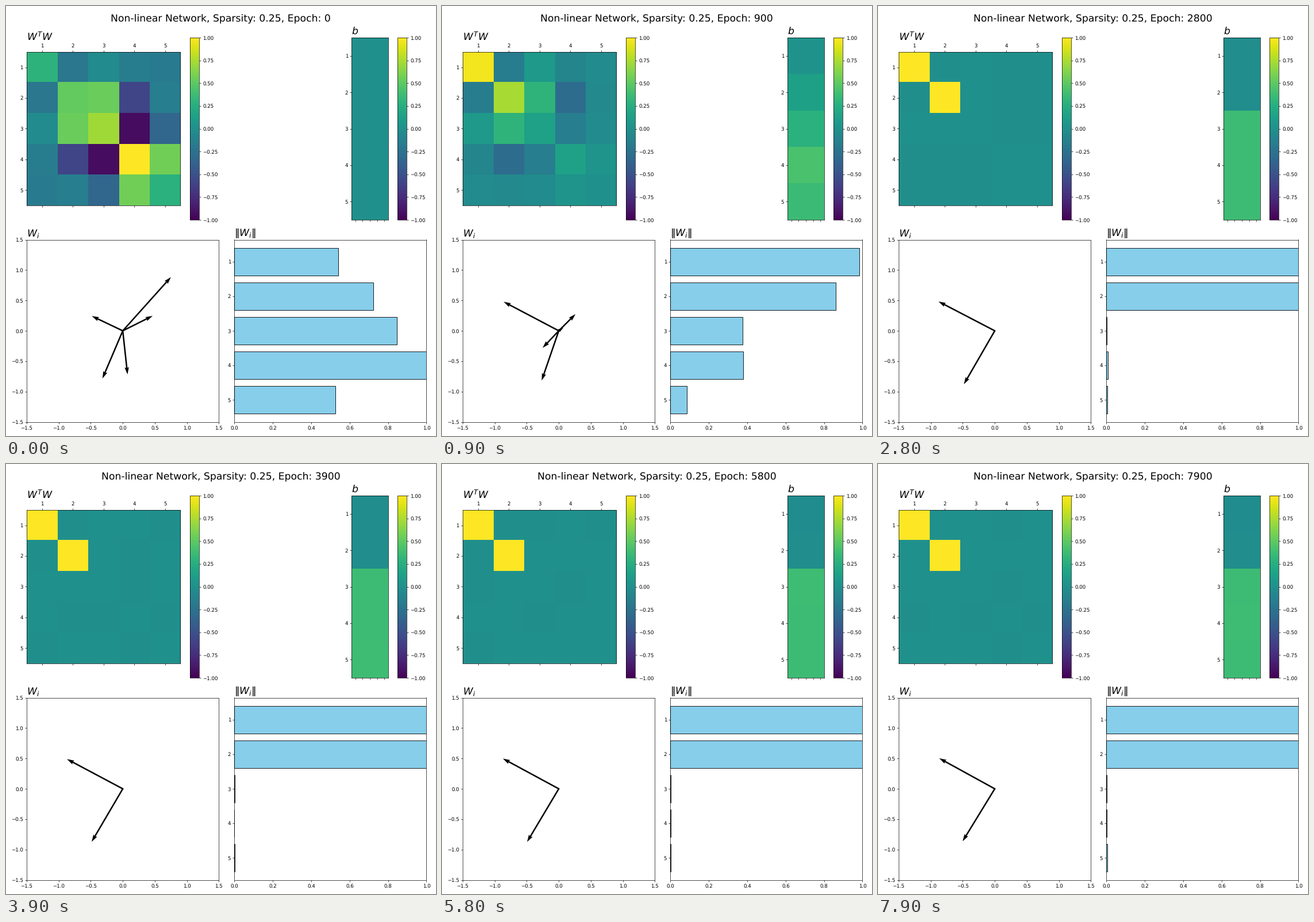
A matplotlib script for the animation above (8 s loop, 748 by 748 pixels).

```python
import matplotlib.pyplot as plt
import numpy as np
from matplotlib.animation import FuncAnimation
from matplotlib.colors import Normalize

SIZE, FRAMES, INTERVAL, N = 748, 80, 100, 5
STEP = 100  # epochs per frame

# Key states of the five features: weight x, weight y, bias
START = np.array([[-.484, .243, 0], [.074, -.718, 0], [-.317, -.785, 0],
                  [.752, .884, 0], [.466, .246, 0]])
EARLY = np.array([[-.768, .465, .20], [.008, -.729, .33], [-.502, -.500, .20],
                  [.457, .522, .42], [.118, .066, .33]])
LATE = np.array([[-.869, .479, .01], [-.452, -.879, 0], [-.083, -.133, .33],
                 [.128, .107, .43], [.040, .040, .39]])
T_EARLY, T_LATE, DECAY = 400, 1500, 350
PACE = np.array([[4], [1.5], [1.5], [1.5], [1.5]])  # feature 1 settles first
MEAN_INPUT = .375

rng = np.random.default_rng(4)
noise = rng.normal(0, .002, (FRAMES, N, 3))


def mix(a, b, u):
    return a + (b - a) * u


def settled(epoch):
    """Two slowly turning orthogonal unit weights; the others vanish."""
    angle = np.radians(151.9 - epoch * 2.6e-4) + np.array([0, np.pi / 2])
    end = np.zeros((N, 3))
    end[:2, 0], end[:2, 1] = 1.002 * np.cos(angle), 1.002 * np.sin(angle)
    end[:, 2] = [-.02, -.02] + [MEAN_INPUT] * 3
    return end


def state(i):
    epoch = i * STEP
    if epoch < T_EARLY:
        return mix(START, EARLY, epoch / T_EARLY)
    if epoch < T_LATE:
        u = (epoch - T_EARLY) / (T_LATE - T_EARLY)
        return mix(EARLY, LATE, 1 - (1 - u) ** PACE)
    done = 1 - np.exp((T_LATE - epoch) / DECAY)
    return mix(LATE, settled(epoch) + noise[i], done)


plt.rcParams["text.hinting"] = "none"
fig, ((ax_gram, ax_bias), (ax_vec, ax_norm)) = plt.subplots(
    2, 2, figsize=(12, 12), dpi=SIZE / 12)
fig.subplots_adjust(left=36 / SIZE, right=731.5 / SIZE,
                    top=1 - 55 / SIZE, bottom=1 - 723.5 / SIZE,
                    wspace=27 / 334.25, hspace=34.5 / 317)
title = fig.suptitle("", x=373.5 / SIZE, fontsize=20)
labels = [str(i + 1) for i in range(N)]


def heatmap(ax, shape):
    im = ax.imshow(np.zeros(shape), cmap="viridis", norm=Normalize(-1, 1))
    fig.colorbar(im, ax=ax)
    ax.set_yticks(range(N), labels)
    return im


gram = heatmap(ax_gram, (N, N))
ax_gram.set_xticks(range(N), labels)
ax_gram.tick_params(axis="x", top=True, labeltop=True,
                    bottom=True, labelbottom=False)

column = heatmap(ax_bias, (N, 1))
ax_bias.set_xticks(np.linspace(-.4, .4, 5), [""] * 5)

zero = np.zeros(N)
arrows = ax_vec.quiver(zero, zero, START[:, 0], START[:, 1],
                       angles="xy", scale_units="xy", scale=1)
ticks = np.linspace(-1.5, 1.5, 7)
ax_vec.set(xlim=(-1.5, 1.5), ylim=(-1.5, 1.5), xticks=ticks, yticks=ticks)

bars = ax_norm.barh(range(1, N + 1), zero, height=.8,
                    color="skyblue", edgecolor="black")
ax_norm.set(xlim=(0, 1), ylim=(5.64, .36))
ax_norm.set_yticks(range(1, N + 1), labels)

for ax, name in [(ax_gram, r"$W^TW$"), (ax_bias, "$b$"),
                 (ax_vec, "$W_i$"), (ax_norm, r"$\Vert W_i \Vert$")]:
    ax.set_title(name, loc="left", fontsize=20)


def update(i):
    values = state(i)
    w, b = values[:, :2], values[:, 2:]
    title.set_text(
        f"Non-linear Network, Sparsity: 0.25, Epoch: {i * STEP}")
    gram.set_data(w @ w.T)
    column.set_data(b)
    arrows.set_UVC(w[:, 0], w[:, 1])
    for bar, length in zip(bars, np.hypot(w[:, 0], w[:, 1])):
        bar.set_width(length)
    return [title, gram, column, arrows, *bars]


anim = FuncAnimation(fig, update, frames=FRAMES, interval=INTERVAL,
                     repeat=True, repeat_delay=0, blit=False)
plt.show()
```
